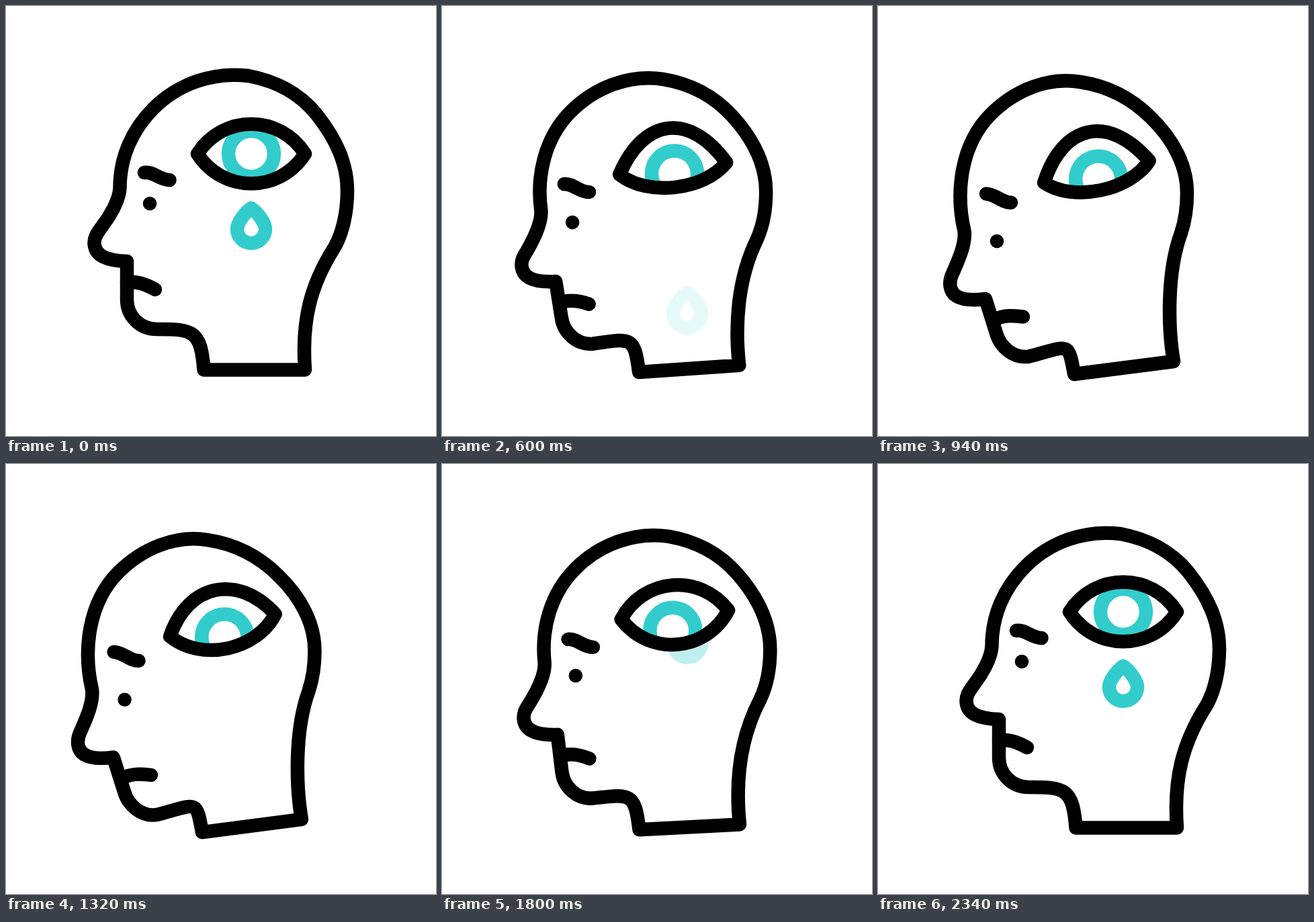
An HTML page for the animation above (2400 ms loop, 640 by 640 pixels).

```html
<!DOCTYPE html>
<html lang="en">
<head>
<meta charset="utf-8">
<title>Sad head</title>
<style>
  html, body { margin: 0; width: 100%; height: 100%; overflow: hidden; background: #fff; }
  svg { display: block; width: 100%; height: 100%; }
  .ink, .aqua { fill: none; stroke: #000; stroke-width: 20.5; stroke-linecap: round; stroke-linejoin: round; }
  .aqua { stroke: #3cc; }
</style>
</head>
<body>
<svg viewBox="0 0 640 640">
  <clipPath id="lens"><path class="lid"/></clipPath>
  <path id="head" class="ink"/>
  <path id="mouth" class="ink"/>
  <path id="brow" class="ink"/>
  <circle id="dot" r="10.3"/>
  <path id="tear" class="aqua" d="M365 301C357 306 344 322 344 332A21 21 0 0 0 386 332C386 322 373 306 365 301Z"/>
  <path class="lid" fill="#fff"/>
  <g clip-path="url(#lens)"><circle id="iris" class="aqua" r="34"/></g>
  <path class="lid ink"/>
</svg>
<script>
const LOOP = 2400, END = 2340, TURN = 1170;
const $ = id => document.getElementById(id);
const lids = document.querySelectorAll('.lid');

// Upright and bowed outlines, blended point by point
const shapes = {
  head: [
    `M294.5 541.5L445 541.5C440 470 452 417 489 359C501 338 508 307 508 275
     C508 235 492 199 462 161C436 129 399 111 361 104C309 97.5 256.6 115.2 219.4 152.4
     C187.2 184.6 169.5 226 169.5 270C169 290 153 315 143 328C134 340 131 346 131.5 354
     C133 372 150 379 180 380L180 437C180 461 199 481 224 481C278 481 290 482 294.5 541.5Z`,
    `M292 548L440 529C432 482 429 398 451 338C457 320 460 300 460 278
     C460 238 440 199 406 166C377 137 341 119 301 113C252 105 203 126 168 161
     C123 206 115 277 128.5 335C131 355 118 382 111 398C108 404 106.5 409 107.5 417
     C110 434 128 440 160 436L176 487C182 508 202 525 225 521.5C285 506 283 498 292 548Z`
  ],
  mouth: ['M180 411C195 410 206 413 222 422', 'M171 468C187 459 203 461 216 462.5'],
  brow: ['M206 248C220 246 228 259 243.5 259', 'M161 279.5C175 280 185 293 198 292.5']
};

// Rows are [time, value]
const bowKeys = [[0, 0], [320, .07], [600, .535], [740, .88], [940, 1], [TURN, 1.02]];
const squintKeys = [[0, 0], [300, 16], [TURN, 16], [1500, 0]];
const gazeX = [[0, 0], [320, 0], [600, 4], [940, 6], [TURN, 6], [1600, 0], [2020, -5], [END, 0]];
const gazeY = [[0, 0], [320, 14], [600, 23.5], [940, 26.5], [1600, 26.5], [2020, 16.3], [END, 0]];

const mix = (a, b, p) => a + (b - a) * p;
const clamp = x => Math.min(1, Math.max(0, x));
const smooth = x => (x = clamp(x), x * x * (3 - 2 * x));

// Monotone cubic curve through the keys
function curve(keys, t) {
  const n = keys.length - 1;
  if (t >= keys[n][0]) return keys[n][1];
  const slope = i => (keys[i + 1][1] - keys[i][1]) / (keys[i + 1][0] - keys[i][0]);
  const tangent = i => {
    if (i === 0 || i === n) return 0;
    const a = slope(i - 1), b = slope(i);
    return a * b > 0 ? 2 * a * b / (a + b) : 0;
  };
  let i = 0;
  while (t >= keys[i + 1][0]) i++;
  const [t0, v0] = keys[i], [t1, v1] = keys[i + 1];
  const h = t1 - t0, s = (t - t0) / h, r = 1 - s;
  return v0 * r * r * (1 + 2 * s) + v1 * s * s * (3 - 2 * s)
    + h * s * r * (tangent(i) * r - tangent(i + 1) * s);
}

function blend([a, b], p) {
  const to = b.match(/[\d.]+/g);
  let i = 0;
  return a.replace(/[\d.]+/g, v => mix(+v, +to[i++], p).toFixed(2));
}

function place(el, x, y) {
  el.setAttribute('cx', x);
  el.setAttribute('cy', y);
}

function drawEye(t, p) {
  const s = curve(squintKeys, t);
  const x = mix(365, 319.5, p) + s * p / 6, y = mix(220, 231, p);
  const up = -59 - s / 3, down = 59 - s / 3, w = 42.5 - s / 2;
  const d = `M-80 ${s}C${-w} ${up} ${w} ${up} 80 ${s}C42.5 ${down} -42.5 ${down} -80 ${s}Z`;
  for (const lid of lids) {
    lid.setAttribute('d', d);
    lid.setAttribute('transform', `translate(${x} ${y}) rotate(${-11.8 * p})`);
  }
  place($('iris'), x + curve(gazeX, t), y + curve(gazeY, t));
}

// The tear wells up before the loop point and drops after it
function drawTear(t) {
  const falling = t < TURN, left = falling ? t : END - t;
  const y = (falling ? 127 : -70) * smooth(left / 640);
  $('tear').setAttribute('transform', `translate(0 ${y})`);
  $('tear').setAttribute('opacity', clamp((640 - left) / 320));
}

function draw(now) {
  const t = Math.min(now % LOOP, END);
  const p = curve(bowKeys, Math.min(t, END - t));
  for (const id in shapes) $(id).setAttribute('d', blend(shapes[id], p));
  place($('dot'), mix(214, 177, p), mix(294, 350, p) - 8 * p * (1 - p));
  drawEye(t, p);
  drawTear(t);
}

const start = performance.now();
function tick() {
  draw(performance.now() - start);
  requestAnimationFrame(tick);
}
tick();
</script>
</body>
</html>
```
